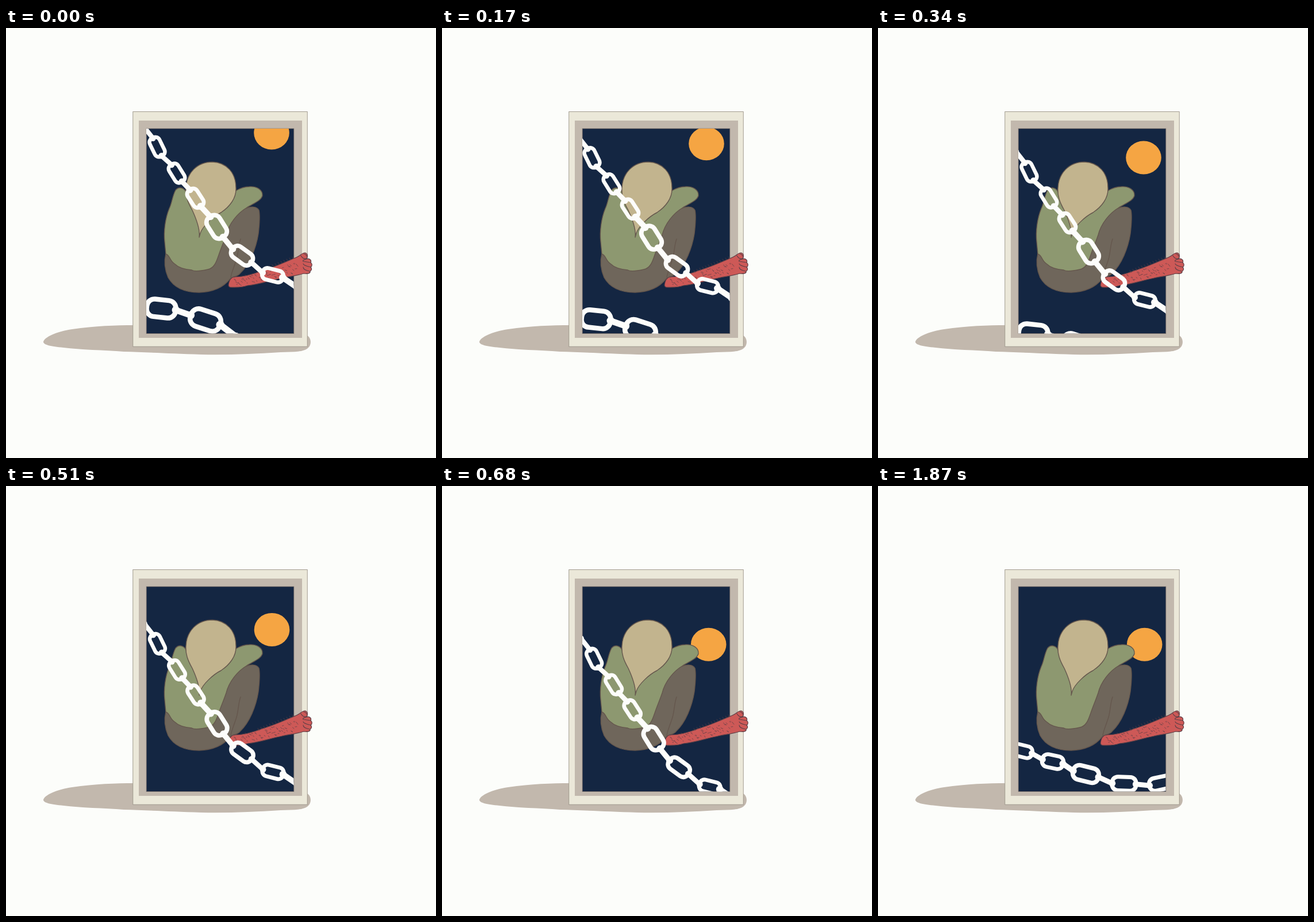
An HTML page that plays this animation: 748 px wide and 748 px high, repeating every 2.55 s.

```html
<!DOCTYPE html>
<html lang="en">
<head>
<meta charset="utf-8">
<title>Chained figure</title>
<style>
  html, body { margin: 0; width: 100%; height: 100%; overflow: hidden; background: #fcfdfa; }
  svg { display: block; width: 100%; height: 100%; }
  .body { stroke: #65574d; stroke-width: 1.4; stroke-linejoin: round; stroke-linecap: round; }
  .chain { stroke: #fdfdfb; fill: none; }
  .foot { stroke: #604047; stroke-width: 1.2; stroke-linecap: round; stroke-linejoin: round; }
</style>
</head>
<body>
<svg viewBox="0 0 748 748">
  <clipPath id="pane"><rect x="244" y="175" width="256.5" height="356.5"/></clipPath>

  <path fill="#c2b8ad" d="M65 546C66 538 88 528 115 524C155 518 190 517 224 517L524 535C531 539 532 550 526 556C517 565 496 563 478 564C430 567 385 569 340 568C280 566 240 564 205 563C170 560 130 560 100 556C78 554 65 551 65 546Z"/>
  <rect x="220.8" y="145.6" width="303.4" height="408.6" fill="#ebe8d9" stroke="#989186" stroke-width=".9"/>
  <rect x="231" y="161" width="284" height="378" fill="#c2b8ad"/>
  <rect x="244.2" y="175" width="256.6" height="356.6" fill="#142642" stroke="#776d68" stroke-width=".8"/>

  <g clip-path="url(#pane)">
    <ellipse id="sun" cx="462" cy="182.5" rx="30.8" ry="29" fill="#f5a543"/>
  </g>

  <g class="body">
    <path fill="#6f665b" d="M278 393C275 405 276 420 282 434C292 452 312 460 336 460C362 459 380 449 390 436C394 432 402 433 407 427C424 411 435 383 439 358C441 341 442 326 440 317C436 310 426 310 416 314L370 345Z"/>
    <path fill="#8d9870" d="M312 283C307 277 300 276 295 282C289 293 289 304 284 314C277 331 274 354 276 372L278 393C286 396 284 404 293 410C300 417 311 420 323 421C328 424 342 422 351 420C362 418 366 407 370 395C374 383 379 372 383 360C388 340 403 322 418 313C430 305 443 301 446 292C447 282 437 275 423 276C414 276 407 279 400 283L340 345Z"/>
    <path fill="#c2b48e" d="M336 364C338 351 330 330 324 317C316 303 312 292 313 278C314 253 332 233 359 233C384 234 400 252 400 278C401 296 389 311 374 321C360 328 342 345 338 357Z"/>
    <path fill="none" d="M408 367C403 381 405 394 399 408C396 418 392 426 391 434"/>
  </g>

  <g class="foot">
    <path fill="#cd5957" d="M387 447C388 440 391 434 397 433C416 433 431 428 446 422C467 416 486 407 505 399C511 397 515 391 520 391C525 392 526 398 522 402C528 400 532 404 530 408C533 410 533 414 530 416C533 419 531 422 529 423C530 427 524 428 518 427C505 431 493 432 480 435C460 439 440 446 420 448C410 452 398 451 390 451Q387 450 387 447Z"/>
    <path fill="none" d="M513 396Q517 403 523 401M522 402Q515 404 517 406L530 408M517 410Q517 413 530 416M517 416Q517 421 528 423M518 393Q522 393 523 397"/>
    <path id="hair" fill="none" stroke-width=".75"/>
  </g>

  <g clip-path="url(#pane)">
    <g id="falling" class="chain"></g>
    <g id="resting" class="chain"></g>
  </g>
</svg>
<script>
const $ = id => document.getElementById(id);

// Each link: x, y, angle, length, width, line weight. Zero length makes a loose end.
function chain(links) {
  const tip = ([x, y, a, len], side) => {
    const reach = Math.max(0, len / 2 - 4) * side, r = a * Math.PI / 180;
    return [x + reach * Math.cos(r), y + reach * Math.sin(r)];
  };
  let out = '';
  links.forEach((link, i) => {
    const [x, y, a, len, wid, w] = link;
    if (len) {
      const l = len - w, h = wid - w;
      out += `<rect x="${-l / 2}" y="${-h / 2}" width="${l}" height="${h}" rx="${h * .43}"
        stroke-width="${w}" transform="translate(${x} ${y}) rotate(${a})"/>`;
    }
    if (!i) return;
    const p = tip(links[i - 1], 1), q = tip(link, -1);
    out += `<path d="M${p}L${q}" stroke-width="${w * 1.25}"/>`;
    for (const end of [p, q])
      out += `<path d="M${end}h.01" stroke-width="${w * 1.6}" stroke-linecap="round"/>`;
  });
  return out;
}

$('falling').innerHTML = chain([
  [240, 172, 0, 0, 0, 6.5],
  [263, 207, 64, 42, 25, 6.5],
  [297, 252.5, 58, 42, 25, 6.5],
  [329.5, 296, 57, 42, 26, 6.8],
  [366.5, 346, 58, 50, 33, 7.8],
  [410.5, 396, 36, 48, 30, 7.5],
  [464, 430, 14, 44, 27, 6.8],
  [506, 451, 0, 0, 0, 8]
]) + chain([
  [270, 488, 6, 59, 39, 8.5],
  [347, 508, 18, 62, 40, 8.5],
  [400, 537, 0, 0, 0, 9]
]);

$('resting').innerHTML = chain([
  [251, 461, 14, 42, 27, 6.5],
  [304, 479.5, 12, 44, 29, 6.8],
  [361.5, 501, 14, 53, 33, 7.6],
  [428, 518, 2, 49, 31, 7.2],
  [492, 517, -12, 48, 29, 7]
]);

// Hairs scattered along the leg.
let seed = 7;
const rand = () => (seed = seed * 16807 % 2147483647) / 2147483647;
let hairs = '';
for (let i = 0; i < 75; i++) {
  const x = 395 + i * 1.5;
  const mid = 442 - (x - 395) * .23, y = mid + (rand() - .5) * 17;
  hairs += `M${x} ${y}l${1 + rand() * 2} ${-1 + rand() * 3.5}`;
}
for (let x = 440; x < 505; x += 5) hairs += `M${x} ${424 - (x - 440) * .39}l-2 -2.5`;
$('hair').setAttribute('d', hairs);

const STEP = 170, LOOP = 2550;
const drops = [[0, 0], [-2, 18.7], [0, 43], [.5, 67.4], [1.7, 93.2]];
const start = performance.now();

function draw(now) {
  const step = Math.floor(Math.max(0, now - start) % LOOP / STEP);
  const landed = step >= drops.length;
  const move = `translate(${drops[Math.min(step, drops.length - 1)]})`;
  $('sun').setAttribute('transform', move);
  $('falling').setAttribute('transform', move);
  $('falling').setAttribute('visibility', landed ? 'hidden' : 'visible');
  $('resting').setAttribute('visibility', landed ? 'visible' : 'hidden');
  requestAnimationFrame(draw);
}
draw(start);
</script>
</body>
</html>
```
